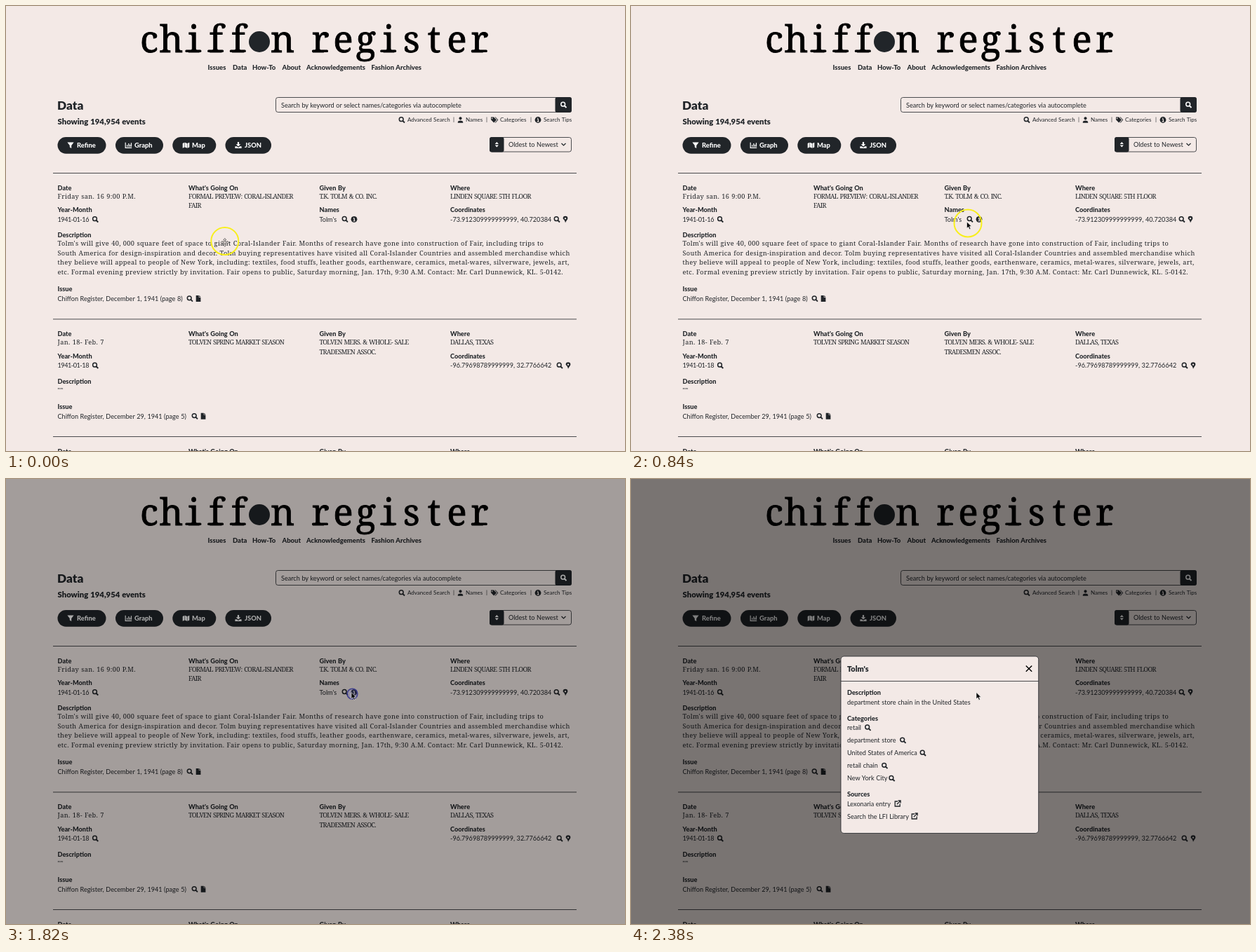
An HTML page for the animation above (4.48 s loop, 882x635 px).

```html
<!DOCTYPE html>
<html lang="en">
<head>
<meta charset="utf-8">
<title>Chiffon Register</title>
<style>
  html, body { margin: 0; width: 100%; height: 100%; overflow: hidden; background: #f3e9e6; }
  svg { display: block; width: 882px; height: 635px; }
  text { font: 9.1px Lato, sans-serif; word-spacing: .3px; fill: #212529; white-space: pre; }
  .bold { font-size: 9.2px; font-weight: 800; }
  .date { letter-spacing: -.45px; }
  .nav { font-size: 9.5px; font-weight: 800; }
  .small { font-size: 8px; }
  .heading { font-size: 17.3px; font-weight: 900; }
  .count { font-size: 11.3px; font-weight: 900; }
  .name { font-size: 10.9px; font-weight: 900; }
  .button { font-size: 9.4px; font-weight: 800; fill: #fff; }
  .typed { font: 500 9.2px "Noto Serif", serif; letter-spacing: .36px; }
  .caps { letter-spacing: -.7px; word-spacing: 1px; }
  .title { font: 53px "Noto Serif", serif; fill: #000; stroke: #000; stroke-width: .8; text-anchor: middle; }
</style>
</head>
<body>
<svg id="stage" viewBox="0 0 882 635">
  <defs>
    <g id="search" fill="none" stroke="currentColor" stroke-width="1.5">
      <circle cx="-.8" cy="-.8" r="2.9"/><path d="M1.3 1.3 4 4" stroke-width="1.9"/>
    </g>
    <g id="info">
      <circle r="4.4" fill="currentColor"/>
      <path d="M-1.2-.7H.4V2.4M-1.4 2.4H1.5M-.3-2.9V-1.7" fill="none" stroke="#f3e9e6" stroke-width="1.1"/>
    </g>
    <path id="pin" d="M0 4.7C-1-.1-3.4-.2-3.4-1.4a3.4 3.4 0 0 1 6.8 0C3.4-.2 1 3 0 4.7ZM0-2.6a1.2 1.2 0 1 0 .01 0Z" fill="currentColor" fill-rule="evenodd"/>
    <g id="file">
      <path d="M-3.3-4.5H.7V-1.7H3.4V4.5H-3.3Z" fill="currentColor"/><path d="M1.3-4.5 3.4-2.3H1.3Z" fill="currentColor"/>
    </g>
    <path id="user" d="M0-4.3a2.1 2.1 0 1 0 .01 0ZM-3.7 4.3V3C-3.7.3 3.7.3 3.7 3V4.3Z" fill="currentColor"/>
    <path id="tags" d="M-5-4H-1L3 0-.8 4-5-.2ZM-3.4-2.9a.8.8 0 1 0 .01 0ZM.4-4H1.5L5.3 0 1.7 4H.6L4.2 0Z" fill="currentColor" fill-rule="evenodd"/>
    <path id="filter" d="M-4.6-4.3H4.6L1.2.2V4.4L-1.2 2.7V.2Z" fill="currentColor"/>
    <path id="graph" d="M-4.3-4V3.6H4.7M-1.8 2V-.5M.3 2V-2.7M2.2 2V-1M4 2V-3.5" fill="none" stroke="currentColor" stroke-width="1.2"/>
    <path id="map" d="M-4.8-2.7-2-3.9V2.8L-4.8 4ZM-1.4-3.9 1.4-2.8V4L-1.4 2.8ZM2-2.8 4.8-4V2.8L2 4Z" fill="currentColor"/>
    <path id="download" d="M-1.1-4.6H1.1V-1.4H3.3L0 1.9-3.3-1.4H-1.1ZM-4.6 1.5H-2.2L0 3.3 2.2 1.5H4.6V4.4H-4.6Z" fill="currentColor"/>
    <path id="sort" d="M-2.6-.8 0-3.8 2.6-.8ZM-2.6.8 0 3.8 2.6.8Z" fill="currentColor"/>
    <path id="external" d="M0-3H-3.8V4H3.2V.6M.6-4H4.1V-.5M4-3.9-1.2 1.3" fill="none" stroke="currentColor" stroke-width="1.3"/>
    <path id="close" d="M-4.2-4.2 4.2 4.2M4.2-4.2-4.2 4.2" fill="none" stroke="#000" stroke-width="1.4"/>
  </defs>
  <g id="page"></g>
  <rect id="shade" width="882" height="635"/>
  <g id="modal"></g>
  <g id="pointer">
    <circle id="halo" r="19.5" fill="none" stroke="#f8ef1c" stroke-width="2"/>
    <circle id="ripple" fill="#6464d2" fill-opacity=".2" stroke="#35358c" stroke-width="1.7"/>
    <path id="arrow" d="M-1.5-2V7.2L.7 5.2 2.3 8.8 3.9 8.1 2.4 4.6H5.2Z" fill="#000" stroke="#fff" stroke-width=".6"/>
    <path id="move" d="M0-6 2-3.5H.8V-.8H3.5V-2L6 0 3.5 2V.8H.8V3.5H2L0 6-2 3.5H-.8V.8H-3.5V2L-6 0-3.5-2V-.8H-.8V-3.5H-2Z" transform="translate(0 2)" fill="#f3e9e6" stroke="#444" stroke-width=".7"/>
  </g>
</svg>
<script>
const INK = '#212529', PAPER = '#f3e9e6', LOOP = 4480;
const el = id => document.getElementById(id);

const label = (x, y, str, cls = '') => `<text x="${x}" y="${y}" class="${cls}">${str.replace(/&/g, '&amp;')}</text>`;
const icon = (name, x, y, color = INK) => `<use href="#${name}" x="${x}" y="${y}" color="${color}"/>`;
const box = (x, y, w, h, r = 0, fill = INK, stroke = 'none') =>
  `<rect x="${x}" y="${y}" width="${w}" height="${h}" rx="${r}" fill="${fill}" stroke="${stroke}" stroke-width=".8"/>`;
const rule = y => box(67, y, 746, .8);
const bold = (x, y, str) => label(x, y, str, 'bold');
const typed = (x, y, lines, cls = 'typed') => lines.map((s, i) => label(x, y + i * 13.5, s, cls)).join('');
const caps = (x, y, ...lines) => typed(x, y, lines, 'typed caps');
const columns = [73.5, 260, 446.5, 633];

// Typewriter lettering: one letter per cell, with wide feet on the narrow letters.
const lettering = (word, x, pitch) => [...word].map((c, i) => {
  const cx = x + i * pitch;
  return label(cx, 65.5, c, 'title') + ('fir'.includes(c) ? box(cx - 12, 62.5, 23, 3.4, 1.5, '#000') : '');
}).join('');

const header = () =>
  lettering('chiff n', 204, 31.7) + lettering('register', 448, 32.4) +
  `<circle cx="361" cy="51" r="15" fill="${INK}"/>` +
  [[287.5, 'Issues'], [323, 'Data'], [351, 'How-To'], [393.5, 'About'], [428, 'Acknowledgements'], [520.5, 'Fashion Archives']]
    .map(([x, s]) => label(x, 91, s, 'nav')).join('');

const toolbar = () =>
  label(73, 147.8, 'Data', 'heading') + label(73.5, 169, 'Showing 194,954 events', 'count') +
  box(384.5, 130.5, 421, 21, 3, 'none', INK) + box(782.5, 130, 23.5, 22, 3) +
  label(392, 144.5, 'Search by keyword or select names/categories via autocomplete') + icon('search', 794.5, 141, '#fff') +
  [[564, 'search', 572, 'Advanced Search'], [647.5, 'user', 655, 'Names'], [696, 'tags', 704, 'Categories'], [758, 'info', 766, 'Search Tips']]
    .map(([ix, name, x, s]) => icon(name, ix, 162.5) + label(x, 165.3, s, 'small')).join('') +
  [637, 684, 747].map(x => label(x, 165.3, '|', 'small')).join('') +
  [[73.5, 69, 'filter', 92, 101, 'Refine'], [156, 68, 'graph', 174.5, 183, 'Graph'], [237.3, 62, 'map', 256.5, 265, 'Map'], [312.5, 65.5, 'download', 331, 340, 'JSON']]
    .map(([x, w, name, ix, tx, s]) => box(x, 187, w, 23.7, 11.85) + icon(name, ix, 198.7, '#fff') + label(tx, 202.3, s, 'button')).join('') +
  box(689.5, 187.5, 116, 20.5, 3, 'none', INK) + box(689, 187, 20.5, 21.5, 3) + icon('sort', 699.3, 197.7, '#fff') +
  label(716, 201, 'Oldest to Newest') +
  `<path d="M791.5 196 794.5 199 797.5 196" fill="none" stroke="${INK}" stroke-width="1.2"/>`;

const entryHeads = y => rule(y) +
  ['Date', "What's Going On", 'Given By', 'Where'].map((s, i) => bold(columns[i], y + 24.5, s)).join('');

const entry = (y, date, coordinates, coordX) => entryHeads(y) +
  bold(73.5, y + 56.2, 'Year-Month') + label(73.5, y + 69.7, date, 'date') + icon('search', 127.3, y + 66.5) +
  bold(633, y + 56.2, 'Coordinates') + label(633, y + 69.7, coordinates) +
  icon('search', coordX, y + 66.5) + icon('pin', coordX + 12, y + 66.5) +
  bold(73.5, y + 92.4, 'Description');

const issue = (y, text, x) => bold(73.5, y, 'Issue') + label(73.5, y + 13.3, text) +
  icon('search', x, y + 10.2) + icon('file', x + 12, y + 10);

const firstEntry = () =>
  entry(238, '1941-01-16', '-73.912309999999999, 40.720384', 785) +
  typed(73.5, 274.5, ['Friday san. 16 9:00 P.M.']) +
  caps(260, 274.5, 'FORMAL PREVIEW: CORAL-ISLANDER', 'FAIR') +
  caps(446.5, 274.5, 'T.K. TOLM & CO. INC.') + caps(633, 274.5, 'LINDEN SQUARE 5TH FLOOR') +
  bold(446.5, 294.2, 'Names') + label(446.5, 307.7, "Tolm's") + icon('search', 483, 304.3) + icon('info', 496, 304.3) +
  typed(73.5, 342, [
    "Tolm's will give 40, 000 square feet of space to giant Coral-Islander Fair. Months of research have gone into construction of Fair, including trips to",
    'South America for design-inspiration and decor. Tolm buying representatives have visited all Coral-Islander Countries and assembled merchandise which',
    'they believe will appeal to people of New York, including: textiles, food stuffs, leather goods, earthenware, ceramics, metal-wares, silverware, jewels, art,',
    'etc. Formal evening preview strictly by invitation. Fair opens to public, Saturday morning, Jan. 17th, 9:30 A.M. Contact: Mr. Carl Dunnewick, KL. 5-0142.'
  ]) +
  issue(407.4, 'Chiffon Register, December 1, 1941 (page 8)', 262);

const secondEntry = () =>
  entry(446.5, '1941-01-18', '-96.79698789999999, 32.7766642', 789) +
  typed(73.5, 483, ['Jan. 18- Feb. 7']) + caps(260, 483, 'TOLVEN SPRING MARKET SEASON') +
  caps(446.5, 483, 'TOLVEN MERS. & WHOLE- SALE', 'TRADESMEN ASSOC.') + caps(633, 483, 'DALLAS, TEXAS') +
  typed(73.5, 552, ['""']) +
  issue(575.2, 'Chiffon Register, December 29, 1941 (page 5)', 269);

const dialog = () =>
  box(299, 253, 281.7, 252.5, 4.5, PAPER, INK) + label(308, 274.8, "Tolm's", 'name') +
  icon('close', 567, 270.6) + box(299, 288, 281.7, .8) +
  bold(308, 308.3, 'Description') + label(308, 321.8, 'department store chain in the United States') +
  bold(308, 344.5, 'Categories') + bold(308, 453, 'Sources') +
  [['retail', 337.5], ['department store', 387.5], ['United States of America', 416], ['retail chain', 361.5], ['New York City', 371.7]]
    .map(([s, x], i) => label(308, 358 + i * 18.1, s) + icon('search', x, 354.8 + i * 18.1)).join('') +
  [['Lexonaria entry', 380], ['Search the LFI Library', 404]]
    .map(([s, x], i) => label(308, 466.6 + i * 18, s) + icon('external', x, 463 + i * 18)).join('');

el('page').innerHTML = header() + toolbar() + firstEntry() + secondEntry() + entryHeads(614);
el('modal').innerHTML = dialog();

// Pointer centre at each 140 ms step; it rests at the last point.
const STEP = 140;
const path = [[311.8, 335.4], [337.5, 329.5], [369.5, 321.8], [419, 312], [451.5, 311], [468.5, 311],
  [480, 310], [492.3, 309.5], [493.2, 308.8], [493.5, 307.6], [493.5, 306.6]];
const show = (id, on) => el(id).style.display = on ? '' : 'none';

function draw(t) {
  const step = Math.floor(t / STEP), time = step * STEP;
  const [x, y] = path[Math.min(step, path.length - 1)];
  el('pointer').setAttribute('transform', `translate(${x} ${y})`);
  show('halo', time < 1540);
  show('move', step === 0);
  show('arrow', step > 0);

  show('ripple', time >= 1540 && time < 2380);
  const spread = time < 1820 ? 0 : (time - 1680) / 560;
  el('ripple').setAttribute('r', 6.2 + 4.6 * spread);
  el('ripple').setAttribute('opacity', 1 - .5 * spread);

  el('shade').setAttribute('opacity', time < 1820 ? 0 : time < 1960 ? .33 : .5);
  show('modal', time >= 1960);
  el('modal').setAttribute('opacity', time < 2100 ? .52 : 1);
  el('modal').setAttribute('transform', `translate(0 ${time < 2100 ? -16.3 : time < 2240 ? -2 : 0})`);
}

const start = performance.now();
(function tick() {
  draw((performance.now() - start) % LOOP);
  requestAnimationFrame(tick);
})();
</script>
</body>
</html>
```
